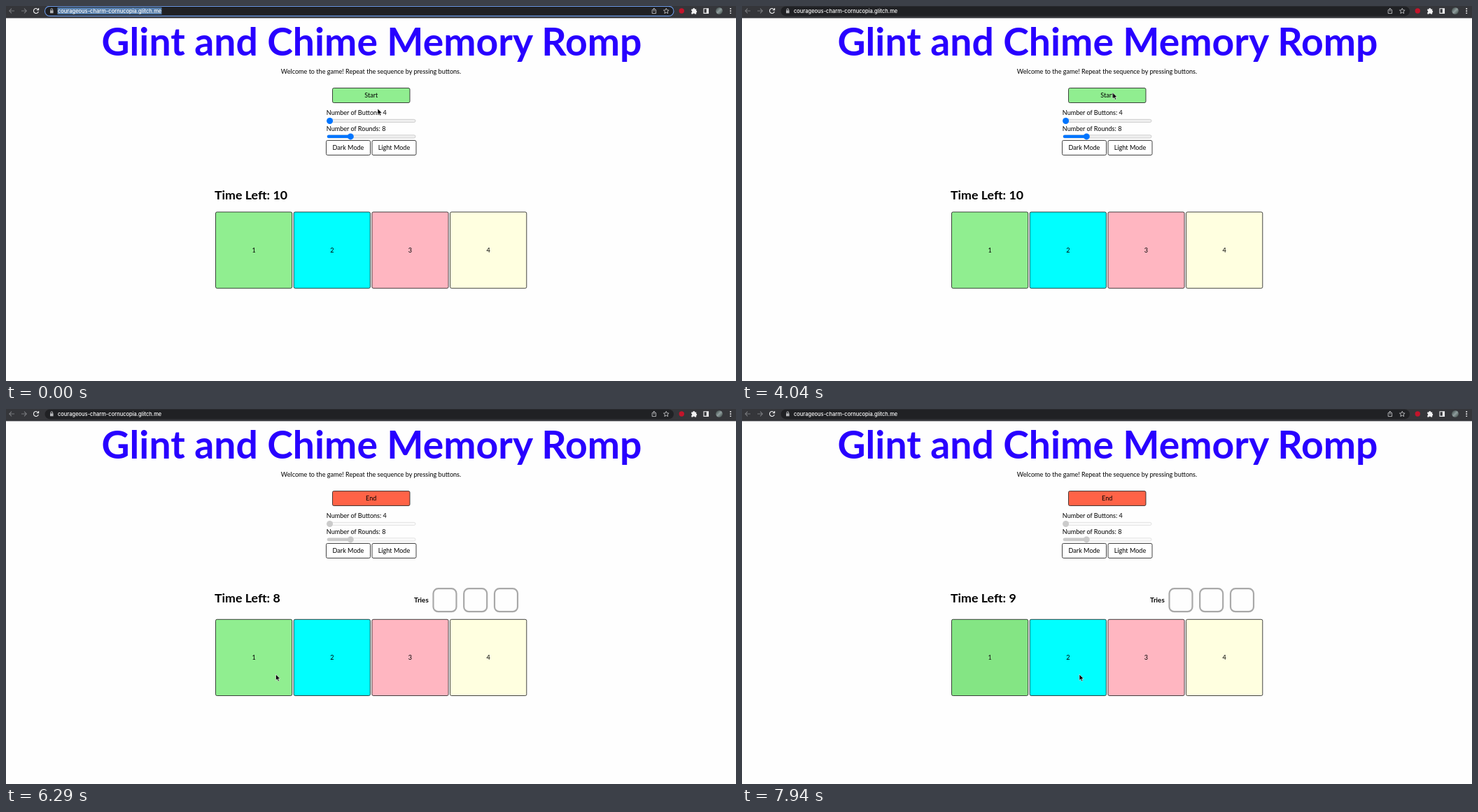
An HTML page that plays this animation: 1043x537 px, repeating every 8000 ms.

```html
<!DOCTYPE html>
<html lang="en">
<head>
<meta charset="utf-8">
<title>Memory game</title>
<style>
  html, body { margin: 0; width: 100%; height: 100%; overflow: hidden; background: #fefefe; }
  svg { display: block; width: 100%; height: 100%; }
  text { font: 9.08px Lato, sans-serif; }
  .mid { text-anchor: middle; }
  #title { font-size: 55.3px; font-weight: 700; fill: #2800ff; }
  #timer { font-size: 17.8px; font-weight: 700; }
  #tries text { font-size: 9.9px; font-weight: 700; }
  #url { font: 500 7.5px Inter, sans-serif; fill: #fff; }
  .button { stroke: #222; stroke-width: .85; }
  .track { fill: #efefef; stroke: #b4b4b4; stroke-width: .6; }
  .value { fill: #0075ff; }
  .off .track { fill: #fafafa; stroke: #d2d2d2; }
  .off .value { fill: #cbcbcb; }
  .icon { fill: none; stroke: #f1f1f2; stroke-width: 1.1; }
  .solid { fill: #f1f1f2; stroke: none; }
  .thin { stroke: #d5d6d9; stroke-width: .8; }
  .dim { stroke: #77787c; }
  .blur .icon { stroke: #98999c; }
  .blur .solid { fill: #98999c; stroke: none; }
</style>
</head>
<body>
<svg viewBox="0 0 1043 537" preserveAspectRatio="none">
  <defs>
    <linearGradient id="avatar" x2="1" y2="1">
      <stop stop-color="#35423f"/><stop offset=".5" stop-color="#8f9d9d"/><stop offset="1" stop-color="#38443f"/>
    </linearGradient>
  </defs>
  <rect width="1043" height="537" fill="#fefefe"/>

  <rect width="1043" height="17.4" fill="#35363a"/>
  <rect x="55.5" y=".4" width="898.5" height="14" rx="7" fill="#202124"/>
  <g id="focus">
    <rect x="55.5" y=".4" width="898.5" height="14" rx="7" fill="none" stroke="#6d9be8" stroke-width="1.1"/>
    <rect x="73.5" y="2" width="149" height="10" fill="#557ca8"/>
  </g>
  <path class="icon dim" d="M12 7H5M8 3.7L4.7 7 8 10.3M22 7h7M26 3.7L29.3 7 26 10.3"/>
  <path d="M63 6.3h4.6v4H63z" fill="#b5b6b9"/>
  <path class="icon thin" d="M64 6.5V5a1.3 1.3 0 0 1 2.6 0v1.5"/>
  <text id="url" x="74" y="9.7">courageous-charm-cornucopia.glitch.me</text>
  <path class="icon thin" d="M924.6 5.6h-1.4v5h5.4v-5h-1.4M925.9 8V3.2M924.2 4.9l1.7-1.7 1.7 1.7"/>
  <path class="icon thin" d="M943.3 3.3l1.1 2.5 2.7.3-2 1.8.6 2.7-2.4-1.4-2.4 1.4.6-2.7-2-1.8 2.7-.3z"/>
  <circle cx="965.3" cy="7" r="3.7" fill="#c3142b"/>
  <g id="tools">
    <path class="icon" d="M45.7 4.8A3.5 3.5 0 1 0 46.3 8M46.6 3v2.8h-2.8"/>
    <path class="icon solid" d="M979.3 4.5h2.1a1.4 1.4 0 0 1 2.8 0h2v2.2a1.4 1.4 0 0 1 0 2.7v2h-2.2a1.3 1.3 0 0 0-2.5 0h-2.2V9.2a1.3 1.3 0 0 0 0-2.5z"/>
    <path class="icon" d="M997 3.8h6.5v6.6H997z"/>
    <path class="icon solid" d="M1000.8 3.8h2.7v6.6h-2.7z"/>
    <path class="icon solid" d="M1034.4 3h1.7v1.7h-1.7zM1034.4 6.2h1.7v1.7h-1.7zM1034.4 9.4h1.7v1.7h-1.7z"/>
  </g>
  <circle cx="1019" cy="7" r="4.8" fill="url(#avatar)"/>

  <text id="title" class="mid" x="522.5" y="71">Glint and Chime Memory Romp</text>
  <text class="mid" x="521.5" y="97">Welcome to the game! Repeat the sequence by pressing buttons.</text>
  <rect id="start" class="button" x="466.5" y="117.5" width="110.5" height="21" rx="2"/>
  <text id="startLabel" class="mid" x="521.7" y="131"></text>
  <text x="457.8" y="156.3">Number of Buttons: 4</text>
  <text x="457.8" y="178.7">Number of Rounds: 8</text>
  <g id="sliders">
    <rect class="track" x="459" y="162.4" width="126" height="4.2" rx="2.1"/>
    <circle class="value" cx="462.6" cy="164.5" r="4.5"/>
    <rect class="track" x="459" y="184.8" width="126" height="4.2" rx="2.1"/>
    <rect class="value" x="458.8" y="184.8" width="34" height="4.2" rx="2.1"/>
    <circle class="value" cx="492.3" cy="186.9" r="4.5"/>
  </g>
  <rect class="button" x="457.5" y="192.5" width="63" height="21" rx="2" fill="#fff"/>
  <text class="mid" x="489" y="206">Dark Mode</text>
  <rect class="button" x="523" y="192.5" width="63" height="21" rx="2" fill="#fff"/>
  <text class="mid" x="554.5" y="206">Light Mode</text>

  <text id="timer" x="298" y="277"></text>
  <g id="tries" fill="none" stroke="#a9a9a9" stroke-width="2.2">
    <text x="583" y="276.5" fill="#000" stroke="none">Tries</text>
    <rect x="610.5" y="257.2" width="33" height="33" rx="7"/>
    <rect x="654.2" y="257.2" width="33" height="33" rx="7"/>
    <rect x="698" y="257.2" width="33" height="33" rx="7"/>
  </g>
  <g id="board"></g>
  <path id="cursor" d="M0 0v8.7l2-1.9 1.4 3.2 1.5-.7-1.4-3h2.7z" fill="#000" stroke="#fff" stroke-width=".6"/>
</svg>
<script>
const $ = id => document.getElementById(id);
const LOOP = 8000, TICK = 150, FADE = 400;
const ADDRESS_LEFT = 3900, GAME_START = 4200, ANSWERED = 6880;

$('board').innerHTML = ['#90ee90', '#0ff', '#ffb6c1', '#ffffe0'].map((color, i) => `
  <g transform="translate(${299.5 + i * 111.7})">
    <rect class="button" y="295" width="109.2" height="109.2" rx="2" fill="${color}"/>
    <text class="mid" x="54.6" y="352.8">${i + 1}</text>
  </g>`).join('');
const firstTile = $('board').firstElementChild;
const [tileFace, tileLabel] = firstTile.children;

// Smooth progress from 0 to 1.
function ease(t, start, duration) {
  const x = Math.min(1, Math.max(0, (t - start) / duration));
  return x * x * (3 - 2 * x);
}
const pulse = (t, on, off) => ease(t, on, FADE) - ease(t, off, FADE);

function cursorAt(t) {
  let x = 531, y = 147;
  const glide = (start, end, toX, toY) => {
    const p = ease(t, start, end - start);
    x += (toX - x) * p;
    y += (toY - y) * p;
  };
  glide(0, 600, 531, 129);
  glide(3300, 3900, 529.8, 124.3);
  glide(4500, 4900, 559, 337);
  glide(4950, 5400, 394, 400.5);
  glide(5750, 6000, 385.5, 380);
  glide(7050, 7350, 482, 380);
  return [x, y];
}

function secondsLeft(t) {
  if (t < GAME_START) return 10;
  return 10 - Math.floor((t - (t < ANSWERED ? GAME_START : ANSWERED)) / 1000);
}

function draw(t) {
  const playing = t >= GAME_START;
  const windowBlurred = t >= 2400 && t < 2700;
  const press = pulse(t, 6500, 6950);
  const light = pulse(t, 5220, 5800) + press + pulse(t, 7880, LOOP);

  $('focus').style.display = windowBlurred || t >= ADDRESS_LEFT ? 'none' : '';
  $('tools').classList.toggle('blur', windowBlurred);
  $('start').setAttribute('fill', playing ? '#ff6347' : '#90ee90');
  $('startLabel').textContent = playing ? 'End' : 'Start';
  $('sliders').classList.toggle('off', playing);
  $('tries').style.display = playing ? '' : 'none';
  $('board').setAttribute('transform', `translate(0 ${playing ? 6.3 : 0})`);
  $('timer').textContent = `Time Left: ${secondsLeft(t)}`;

  const redBlue = 144 * (1 - light), white = 255 * light;
  tileFace.setAttribute('fill', `rgb(${redBlue}, ${238 - 110 * light}, ${redBlue})`);
  tileLabel.setAttribute('fill', `rgb(${white}, ${white}, ${white})`);
  firstTile.setAttribute('transform', `translate(299.5 ${2.7 * press})`);
  $('cursor').setAttribute('transform', `translate(${cursorAt(t)})`);
}

const begin = performance.now();
function frame() {
  const t = (performance.now() - begin) % LOOP;
  draw(Math.floor((t + 10) / TICK) * TICK);
  requestAnimationFrame(frame);
}
frame();
</script>
</body>
</html>
```
